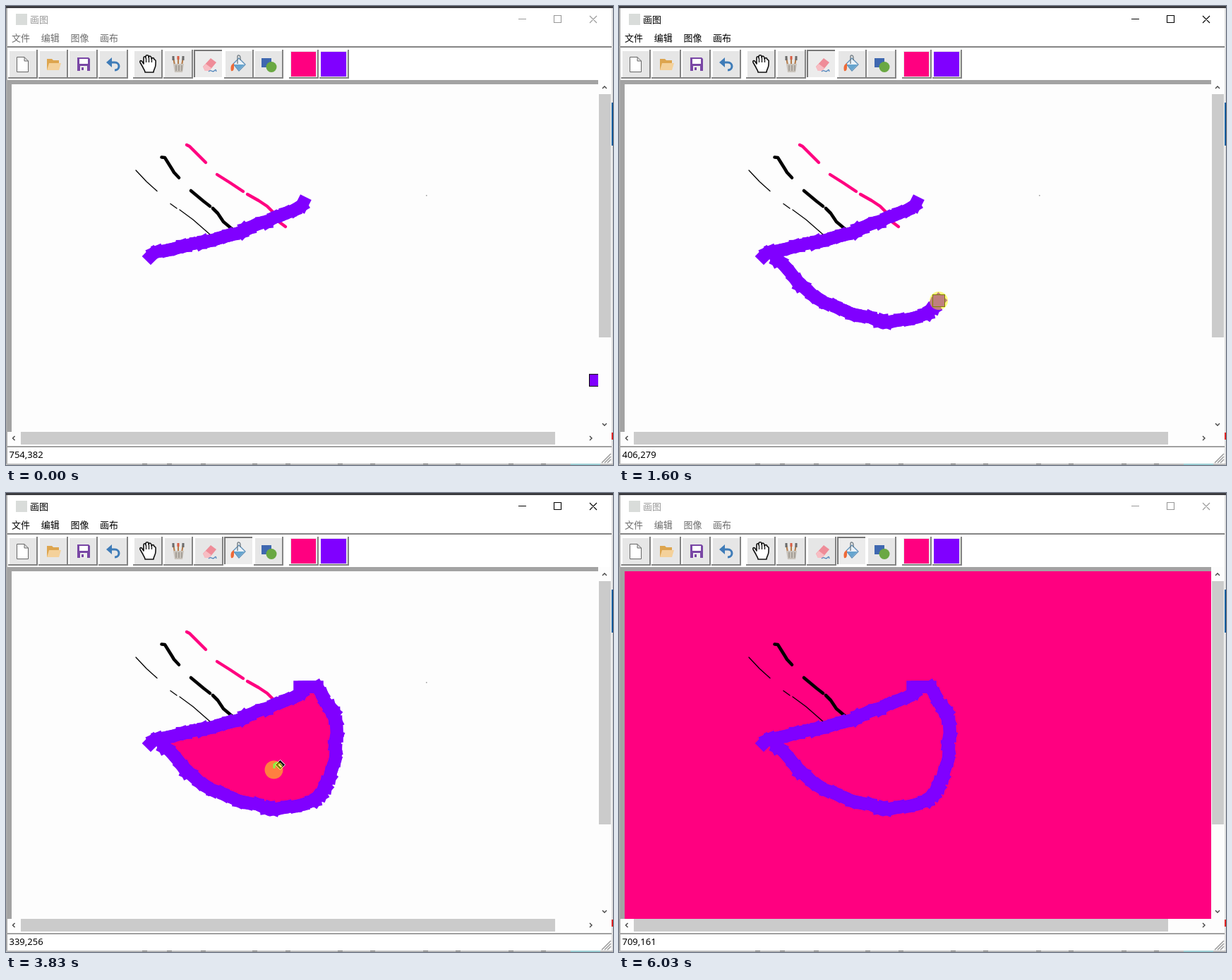
Write an HTML page with a canvas that moves like this. It is 860x651 px and loops after 6.13 s.

```html
<!DOCTYPE html>
<html lang="zh">
<head>
<meta charset="utf-8">
<title>画图</title>
<style>
html, body { margin: 0; width: 100%; height: 100%; overflow: hidden; background: #fff }
canvas { display: block }
</style>
</head>
<body>
<canvas id="stage" width="860" height="651"></canvas>
<script>
const c = document.getElementById('stage').getContext('2d');
const PINK = '#ff0080', VIOLET = '#8000ff', PAPER = '#fdfdfd', LOOP = 6130;
const UI = '"Noto Sans CJK SC", "Noto Sans CJK", sans-serif';

// The eraser paints with the background colour: an old stroke, then one point per step
const chord = [[205, 355], [209, 351], [222, 347.5], [262, 338], [300, 330], [322, 324], [345, 315],
  [375, 303], [402, 292], [419, 283], [421, 279]];
const bowl = [[221, 355], [239, 373.8], [256, 396], [286, 418], [330, 437], [380, 448.5], [415, 443],
  [438, 436], [453, 418], [464, 385], [469, 345], [465, 312], [441, 275], [416, 275]];
const BOWL_START = 8;

// Pointer path as [step, x, y]
const moves = [[0, 835, 530.8], [1, 690, 450], [2, 480, 330], [3, 260, 275], [4, 126, 343], [5, 136, 349],
  [6, 156, 355], [7, 186, 357], ...bowl.map((p, i) => [BOWL_START + i, ...p]),
  [23, 410, 258], [24, 381, 220], [25, 349, 177], [26, 323.5, 108.2], [32, 345, 160], [33, 362, 260],
  [34, 376, 360], [35, 379.5, 393.6], [36, 379.5, 392.5], [41, 372, 372], [42, 352, 330],
  [43, 336, 298], [44, 330.1, 288.2], [51, 365, 288.2], [52, 402, 288.2], [60, 785.6, 288.2]];

function box(x, y, w, h, color) {
  c.fillStyle = color;
  c.fillRect(x, y, w, h);
}

function shape(d, fill, stroke, width = 1) {
  const p = new Path2D(d);
  if (fill) { c.fillStyle = fill; c.fill(p); }
  if (stroke) { c.strokeStyle = stroke; c.lineWidth = width; c.stroke(p); }
}

function disc(x, y, r, color) {
  c.fillStyle = color;
  c.beginPath();
  c.arc(x, y, r, 0, 7);
  c.fill();
}

function text(s, x, y, color, font = UI) {
  c.fillStyle = color;
  c.font = '13px ' + font;
  c.fillText(s, x, y);
}

// Short square-capped pieces with a little wobble give the ragged edge
function erase(points) {
  let seed = 7;
  const wobble = () => ((seed = seed * 16807 % 2147483647) / 2147483647 - .5) * 3;
  c.strokeStyle = VIOLET;
  c.lineWidth = 17.5;
  c.lineCap = 'square';
  for (let i = 1; i < points.length; i++) {
    const [ax, ay] = points[i - 1], [bx, by] = points[i];
    const n = Math.ceil(Math.hypot(bx - ax, by - ay) / 7), flat = ay === by;
    let x = ax, y = ay;
    for (let k = 1; k <= n; k++) {
      const w = k < n && !flat ? 1 : 0;
      const nx = ax + (bx - ax) * k / n + w * wobble(), ny = ay + (by - ay) * k / n + w * wobble();
      c.beginPath();
      c.moveTo(x, y);
      c.lineTo(nx, ny);
      c.stroke();
      x = nx;
      y = ny;
    }
  }
  c.lineCap = 'butt';
}

function drawPaper(n) {
  box(8, 111, 831, 493, n >= 49 ? PINK : PAPER);
  if (n < 49) box(595, 268, 1.5, 1.5, '#999');
  if (n >= 38) shape('M' + [...bowl, ...chord.slice().reverse()].join('L') + 'Z', PINK);
  c.lineCap = c.lineJoin = 'round';
  shape('M184 233L199 249L214 262.5M233 280.5L242 287M246 289L265 303L289 324', null, '#000', 1.3);
  shape('M220.5 214.5L225 215L235 231L238 236L245 243.5M262 262L280 277L289 284M293 287L300 294L308 306L320 316M332 327L335 327', null, '#000', 4.6);
  shape('M256 197L260 199L271 210L283 222M299 239L318 251L336 263M342 267L358 276L370 284L378 292L388 307L396 313', null, PINK, 4.4);
  c.lineJoin = 'miter';
  erase(chord);
  if (n >= BOWL_START) erase(bowl.slice(0, n - BOWL_START + 1));
}

function drawPointer(n, x, y) {
  if (n <= 26) {
    box(x - 9, y - 9, 18, 18, '#000');
    box(x - 8, y - 8, 16, 16, VIOLET);
  } else if (n >= 32 && n < 60) {
    c.save();
    c.translate(x + 8, y - 7);
    c.globalCompositeOperation = 'difference';
    shape('M-9 5V-1L-5-4H-1L-4-1L-6 0V5Z', '#fff');
    c.globalCompositeOperation = 'source-over';
    shape('M-6 0L1-7L8 0L1 7Z', '#000', '#fff', 1);
    shape('M-2 0L1-3L5 1L2 4Z', '#fff');
    shape('M0-2L4 2', null, '#000', 1.5);
    c.restore();
  }
  const pressed = n >= 8 && n <= 21 || n === 38 || n === 47 || n === 48;
  if (pressed) disc(x, y, 13, 'rgba(255,255,0,.5)');
}

function button(x, down) {
  box(x, 62, 42, 41, down ? '#fff' : '#848484');
  box(x, 62, 40, 39, down ? '#777' : '#fff');
  box(x + 2, 64, 38, 37, down ? '#ececec' : '#e6e6e6');
}

function drawTools(bucket) {
  [3, 46, 88, 131, 180, 223, 266, 309, 351, 401, 444].forEach((x, i) => button(x, i === (bucket ? 7 : 6)));
  shape('M15.5 72.5H26L31.5 78V93.5H15.5ZM26 72.5V78H31.5', '#fff', '#666');
  shape('M58 75H65L67 77H75V91H58Z', '#dda54e');
  shape('M58 91L61 81H78L75 91Z', '#f4d19a');
  shape('M101 73H117L119 75V92H101Z', '#7947a5');
  box(104, 75, 12, 7, '#fff');
  box(105, 85, 10, 7, '#eee');
  box(107, 87, 3, 4, '#7947a5');
  c.lineJoin = 'round';
  shape('M146 80H154C162 80 162 91 154 91', null, '#3f7cb8', 3);
  shape('M142 80L150 73V87Z', '#3f7cb8');
  shape('M194 87L190 80C189 77 192 77 193 79L195 82V74C195 71 198 71 198 74V72C198 69 202 69 202 72V73C203 70 206 71 206 74V75C207 73 210 73 210 76C213 76 212 79 212 83C212 88 209 90 209 94H197C197 91 195 90 194 87Z', '#fff', '#111', 1.6);
  shape('M198.5 74V80M202.5 73V80M206.5 75V80', null, '#111', 1.3);
  shape('M239 84L237 73M244 84V73M249 84L251 73', null, '#b47a48', 2);
  shape('M237 77V71M251 77V71', null, '#6b6b6b', 3);
  shape('M244 76V71', null, '#d95c42', 3);
  shape('M237 82H252L250 94H239Z', '#c8c2ba');
  shape('M241 84V92M245 84V92M249 84V92', null, '#908a84', 1.2);
  shape('M279 86L290 74L298 80L288 92L282 92Z', '#ef8c98');
  shape('M279 86L283 82L291 88L288 92H282Z', '#f7bdc3');
  shape('M287 93C291 89 292 95 295 92S297 91 298 93', null, '#4d83bb', 1.3);
  shape('M322 82L330 74L339 83L330 92Z', '#eaf2f8', '#5d8fb8', 1.3);
  shape('M323 83H338L330 91Z', '#66a5cf');
  shape('M328 82V71C329 69 332 70 332 73V77', null, '#6c7880', 1.3);
  shape('M323 81C318 83 318 88 319 92C322 93 323 90 323 87Z', '#ee6a38');
  c.lineJoin = 'miter';
  box(362, 74, 14, 13, '#3f68b0');
  disc(376, 86.5, 7.5, '#6aa843');
  box(404, 65, 35, 35, PINK);
  box(446, 65, 36, 35, VIOLET);
}

function drawWindow(n) {
  const active = n >= 8 && n < 60, ink = active ? '#000' : '#999', menu = active ? '#000' : '#6d6d6d';
  box(0, 0, 860, 651, '#fff');
  box(0, 0, 860, 3, '#3b3b3f');
  box(0, 3, 2, 648, '#aaa');
  box(858, 3, 2, 648, '#dedede');
  box(858, 137, 2, 61, '#0b5c9c');
  box(858, 605, 2, 10, '#d22');
  box(14, 11, 16, 16, '#d9dcda');
  text('画图', 34, 24, ink);
  ['文件', '编辑', '图像', '画布'].forEach((s, i) => text(s, 8 + i * 41.7, 50, menu));
  shape('M726 18.5H737M776.5 13.5H786.5V23.5H776.5ZM827 14L837 24M837 14L827 24', null, ink, 1.1);
  box(2, 57, 856, 2, '#858585');
  drawTools(n >= 30);
  box(2, 105, 838, 6, '#a3a3a3');
  box(2, 105, 6, 499, '#a3a3a3');
  box(839, 105, 19, 499, PAPER);
  box(840, 125, 17, 345, '#cbcbcb');
  box(2, 604, 856, 18, PAPER);
  box(21, 604, 757, 18, '#cbcbcb');
  shape('M845 117L848 114L851 117M845 592L848 595L851 592M12.5 610L9.5 613L12.5 616M827 610L830 613L827 616', null, '#444', 1.4);
  box(2, 624, 856, 2, '#a0a0a0');
  shape('M844 648L857 635M848 648L857 639M852 648L857 643', null, '#999', 1.5);
  box(0, 649, 860, 2, '#bbb');
  for (const x of [193, 228, 276, 349, 396, 470, 516, 591, 637, 712, 758]) box(x, 649, 7, 1, '#666');
  box(800, 649, 42, 2, '#9ccfd4');
}

function stepAt(t) {
  const lag = t < 2050 ? 0 : t < 3700 ? 10 : 30;
  return Math.floor((t - lag) / 100);
}

function frame() {
  const n = stepAt(performance.now() % LOOP);
  const [, x, y] = moves.filter(m => m[0] <= n).pop();
  drawWindow(n);
  c.save();
  c.beginPath();
  c.rect(8, 111, 831, 493);
  c.clip();
  drawPaper(n);
  drawPointer(n, x, y);
  c.restore();
  if (n >= 26 && n <= 31) {
    const [ax, ay] = [[349, 67], [339, 76], [331, 83]][Math.min(n - 26, 2)];
    c.save();
    c.translate(ax, ay);
    shape('M0 0V17L4 13.5L6.5 20L9.5 18.5L7 12.5H12Z', '#fff', '#555');
    c.restore();
  }
  const unit = (v, start) => Math.round((v - start) / 1.0976);
  text(unit(x, 7.4) + ',' + unit(y, 111.5), 4.5, 641, '#000', '"Noto Sans", sans-serif');
  requestAnimationFrame(frame);
}
frame();
</script>
</body>
</html>
```
